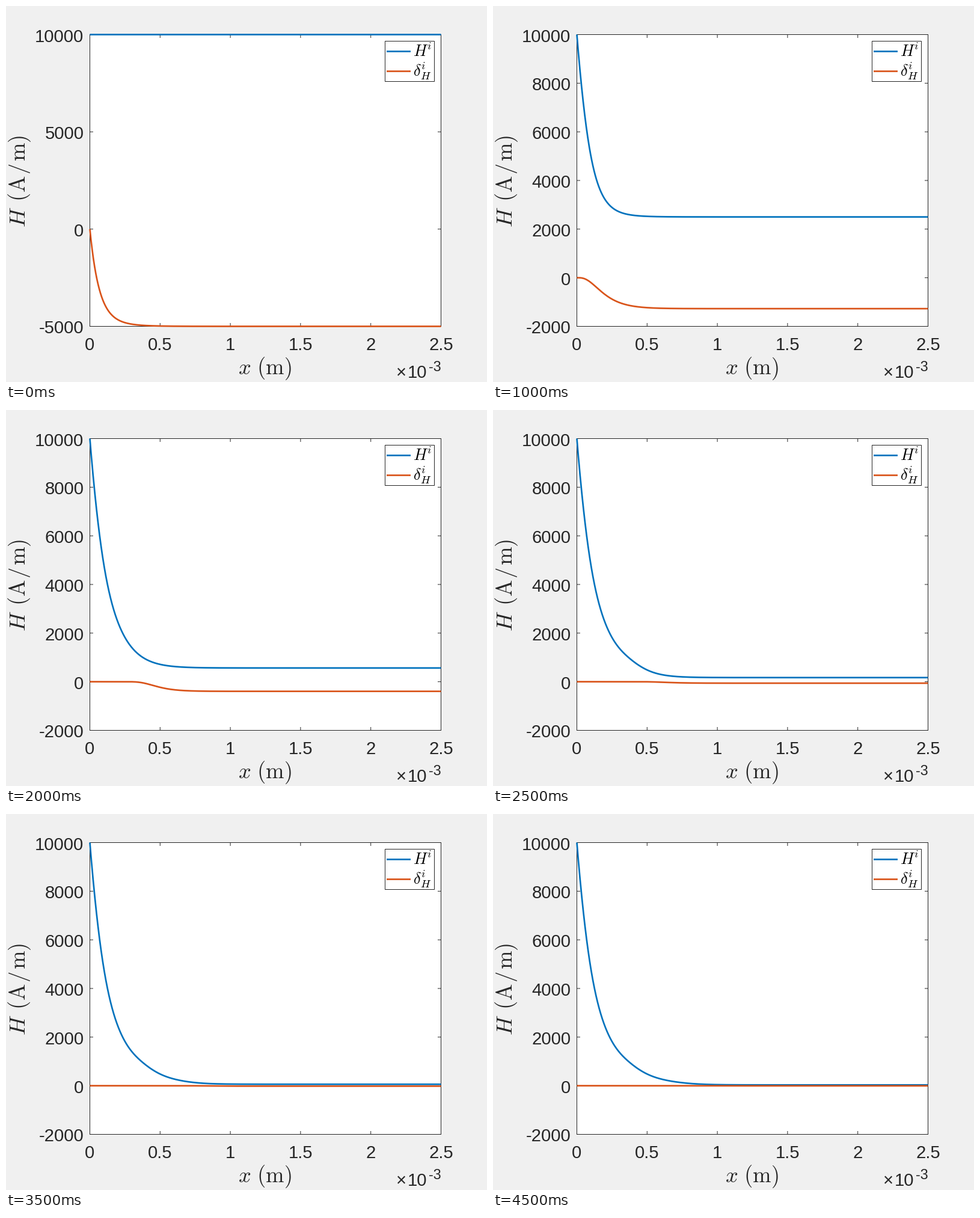
A matplotlib script that plays this animation: 800x625 px, repeating every 5000 ms.

```python
import numpy as np
import matplotlib
matplotlib.rcParams["mathtext.fontset"] = "cm"
import matplotlib.pyplot as plt
from matplotlib.animation import FuncAnimation
from matplotlib.patches import Rectangle

W, H, DPI = 800, 625, 100
LEFT, RIGHT, TOP, BOTTOM = 139.5, 723.5, 47.5, 532.5
BLUE, ORANGE, INK = "#0072BD", "#D95319", "#262626"
PT = 72 / DPI
TICK = 5.5

fig = plt.figure(figsize=(W / DPI, H / DPI), dpi=DPI, facecolor="#F0F0F0")
ax = fig.add_axes([0, 0, 1, 1])
ax.set_xlim(0, W)
ax.set_ylim(H, 0)
ax.axis("off")


def label(x, y, text, size, ha="left", color=INK, z=3, **kw):
    return ax.text(x, y, text, fontsize=size * PT, ha=ha, va="baseline",
                   family="Liberation Sans", color=color, zorder=z, **kw)


def stroke(color, width, z):
    return ax.plot([], [], color=color, lw=width * PT, zorder=z, snap=False,
                   solid_capstyle="butt", solid_joinstyle="round")[0]


def box(x0, y0, x1, y1, z, face="none"):
    ax.add_patch(Rectangle((x0, y0), x1 - x0, y1 - y0, fc=face, ec=INK,
                           lw=PT, zorder=z, snap=False))


def segments(parts):
    """Join separate two-point segments into one broken line."""
    xs, ys = [], []
    for x0, y0, x1, y1 in parts:
        xs += [x0, x1, np.nan]
        ys += [y0, y1, np.nan]
    return xs, ys


# Newton-like iteration: each correction is a front that moves inwards.
# (amplitude, length in mm, sharpness)
STEPS = [(2500, 0.074, 2.4), (1272, 0.105, 3.8), (663, 0.115, 10.3),
         (395, 0.09, 140), (60, 0.10, 460), (50, 0.10, 1250),
         (17, 0.10, 3000), (10, 0.10, 5000), (5, 0.10, 7000)]

x = np.linspace(0, 2.5, 900)
px = LEFT + x / 2.5 * (RIGHT - LEFT)


def rise(length, n=1):
    return (1 - np.exp(-x / length)) ** n


deltas = [-5000 * (0.85 * rise(0.063) + 0.15 * rise(0.13))]
deltas += [-a * rise(length, n) for a, length, n in STEPS]
fields = [np.full_like(x, 10000.0)]
for d in deltas[:-1]:
    fields.append(fields[-1] + d)


def y_range(i):
    return [(-5000, 5000), (-4000, 2000)][i] if i < 2 else (-2000, 2000)


# Plot box, fixed ticks and axis labels
box(LEFT, TOP, RIGHT, BOTTOM, 0, "white")
x_parts = []
for k, text in enumerate(["0", "0.5", "1", "1.5", "2", "2.5"]):
    tx = LEFT + k * (RIGHT - LEFT) / 5
    label(tx, 572.5, text, 29.3, "center")
    x_parts += [(tx, BOTTOM, tx, BOTTOM - TICK), (tx, TOP, tx, TOP + TICK)]
stroke(INK, 1, 1).set_data(*segments(x_parts))

label(657.5, 618.5, "\u00d7", 29.3, "center")
label(667.5, 618.5, "10", 29.3)
label(723.5, 607, "-3", 23.4, "right")
label(385.5, 612, r"$x\ \mathrm{(m)}$", 36.7)
label(32.5, 367.5,
      r"$H\hspace{0.08}\ \mathrm{(A}\hspace{0.1}\mathrm{/}"
      r"\hspace{0.1}\mathrm{m)}$",
      36.7, rotation=90, rotation_mode="anchor")

# Legend
box(630.5, 58.5, 712.5, 125.5, 6, "white")
for y, color in ((75.5, BLUE), (108.5, ORANGE)):
    stroke(color, 2.67, 7).set_data([633, 673], [y, y])
for lx, ly, text, size in ((677, 83, "$H$", 26.5), (700, 72.5, "$i$", 18.5),
                           (677, 116, r"$\delta$", 26.5),
                           (690.5, 105, "$i$", 18.5),
                           (689, 122, "$H$", 18.5)):
    label(lx, ly, text, size, color="black", z=7)

# Parts that change
y_ticks = stroke(INK, 1, 1)
y_labels = [label(129.5, 0, "", 29.3, "right") for _ in range(8)]
field_line = stroke(BLUE, 2.67, 4)
delta_line = stroke(ORANGE, 2.67, 5)


def draw(i):
    low, step = y_range(i)

    def to_px(v):
        return TOP + (10000 - v) / (10000 - low) * (BOTTOM - TOP)

    values = list(range(low, 10001, step))
    parts = []
    for k, text in enumerate(y_labels):
        shown = k < len(values)
        text.set_visible(shown)
        if shown:
            ty = to_px(values[k])
            text.set_text(str(values[k]))
            text.set_y(ty + 12)
            parts += [(LEFT, ty, LEFT + TICK, ty),
                      (RIGHT, ty, RIGHT - TICK, ty)]
    y_ticks.set_data(*segments(parts))
    field_line.set_data(px, to_px(fields[i]))
    delta_line.set_data(px, to_px(deltas[i]))
    return [y_ticks, field_line, delta_line, *y_labels]


anim = FuncAnimation(fig, draw, frames=10, interval=500, repeat=True,
                     repeat_delay=0, blit=False)
plt.show()
```
